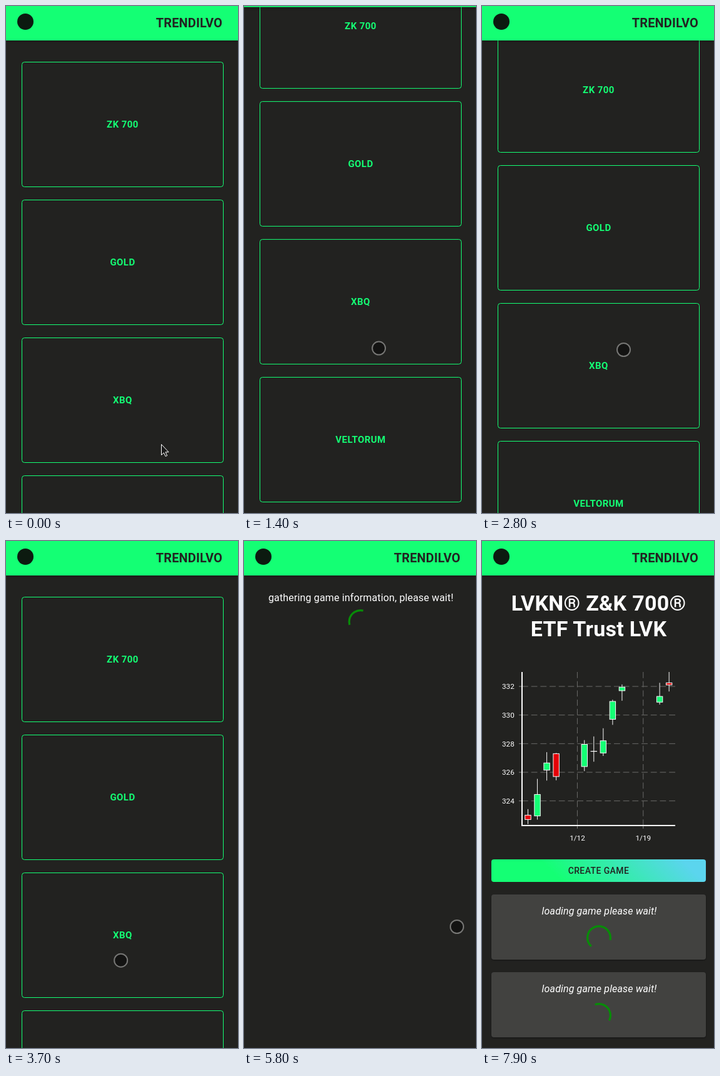
Recreate the animation shown at these times as an HTML page. Size 371x809 px, loop 8 s.

```html
<!DOCTYPE html>
<html lang="en">
<head>
<meta charset="utf-8">
<title>Market game</title>
<style>
  html, body { margin: 0; width: 100%; height: 100%; overflow: hidden; background: #222220; }
  svg { display: block; width: 100%; height: 100%; font-family: Roboto, sans-serif; }
  .mid { text-anchor: middle; }
  .end { text-anchor: end; }
  .card rect { fill: none; stroke: #14ff74; }
  .card text { fill: #14ff74; font: bold 15px Roboto, sans-serif; letter-spacing: .43px; }
  .bar { filter: drop-shadow(0 1px 2px rgba(0,0,0,.3)); }
  .brand { font-weight: bold; font-size: 20px; letter-spacing: .15px; }
  .body { font-size: 16px; letter-spacing: .15px; }
  .title { font-weight: bold; font-size: 34px; letter-spacing: .25px; }
  .axis text { font-size: 12px; fill: #fff; }
  .axis path { stroke: #fff; }
  .axis .grid { stroke: #6c6c6a; stroke-dasharray: 10 5; }
  .axis .tick { stroke: #8a8a88; }
  .axis .main { stroke-width: 2; fill: none; }
  .button { width: 343px; height: 36px; border-radius: 4px;
    background: linear-gradient(45deg, #14ff74 30%, #5bd5ee 90%);
    font: 500 14px/36px Roboto, sans-serif; letter-spacing: .4px; color: #222220; text-align: center; }
  .panel rect { fill: #424240; filter: drop-shadow(0 1px 1px rgba(0,0,0,.4)); }
  .panel text { fill: #fff; font-style: italic; }
  .spin { fill: none; stroke: #088c08; stroke-width: 3.6; }
</style>
</head>
<body>
<svg viewBox="0 0 371 809" preserveAspectRatio="none">
  <rect width="371" height="809" fill="#222220"/>

  <g id="home">
    <g id="cards"></g>
    <rect y="979" width="371" height="131" fill="#14ff74"/>
    <rect x="73" y="1013" width="20" height="20"/>
    <circle cx="186.5" cy="1023" r="10"/>
    <rect x="280" y="1013" width="20" height="20"/>
    <g class="mid" fill="#222220">
      <text class="body" x="186.5" y="1058">Follow us on Social Media!</text>
      <text x="186.5" y="1082" font-size="14" letter-spacing=".15">Copyright © Trendilvo 2020.</text>
    </g>
  </g>

  <g id="wait">
    <text class="body mid" x="187" y="96" fill="#fff">gathering game information, please wait!</text>
  </g>

  <g id="game">
    <g class="title mid" fill="#fff">
      <text x="186.5" y="111">LVKN® Z&amp;K 700®</text>
      <text x="186.5" y="152">ETF Trust LVK</text>
    </g>
    <g id="zoom">
      <g id="chart" class="axis" transform="translate(15 160) scale(.98)"></g>
      <foreignObject x="15" y="508" width="343" height="36">
        <div class="button">CREATE GAME</div>
      </foreignObject>
      <g id="panelA" class="panel"></g>
    </g>
    <g id="panelB" class="panel"></g>
  </g>

  <g id="header">
    <rect class="bar" width="371" height="55" fill="#14ff74"/>
    <circle cx="31" cy="25" r="13" fill="#0c1a10"/>
    <text class="brand end" x="346" y="34" fill="#222220">TRENDILVO</text>
  </g>

  <path id="arrow" d="M248.5 699.5v17l3.9-3.6 2.7 5.7 2.6-1.2-2.6-5.6h5z" fill="#1a1a1a" stroke="#fff"/>
  <circle id="touch" r="10.5" fill="#111" fill-opacity=".85" stroke="#777775" stroke-width="2"/>
</svg>
<script>
const LOOP = 8000, STEP = 100;
const $ = id => document.getElementById(id);

const linear = u => u;
const speedUp = u => u ** 1.5;
const settle = u => 1 - (1 - u) ** 2.5;
const inOut = u => u < .5 ? 2 * u * u : 1 - 2 * (1 - u) ** 2;
const clamp = u => Math.max(0, Math.min(1, u));

function add(parent, tag, attrs, text) {
  const el = document.createElementNS('http://www.w3.org/2000/svg', tag);
  for (const k in attrs) el.setAttribute(k, attrs[k]);
  if (text) el.textContent = text;
  return parent.appendChild(el);
}

// Each move is [begin, end, goal, ease]; the value rests between moves.
function follow(from, moves, t) {
  return moves.reduce((at, [begin, end, goal, ease = linear]) => {
    const u = ease(clamp((t - begin) / (end - begin)));
    return at.map((v, k) => v + (goal[k] - v) * u);
  }, from);
}

const scroll = t => follow([0], [
  [700, 1600, [229], speedUp],
  [1700, 2000, [301]],
  [2200, 2800, [55]],
  [2900, 3200, [0]]
], t);

const headerY = t => follow([0], [[1100, 1500, [-55], settle], [2100, 2650, [0], settle]], t);

const touch = t => follow([240, 712], [
  [0, 300, [218.5, 712]],
  [400, 600, [224.5, 703.5]],
  [700, 1600, [211.5, 474], speedUp],
  [1700, 2000, [267.5, 302]],
  [2100, 2200, [267.5, 309.5]],
  [2200, 2800, [226.5, 548.5]],
  [2900, 3100, [357, 600]],
  [3100, 3300, [207.5, 698.5]],
  [3600, 3900, [136, 610.5]],
  [4000, 4400, [182.5, 236.5], inOut],
  [5500, 5800, [340.5, 615.5], inOut],
  [5900, 6400, [354.5, 658.5]],
  [6700, 7000, [340, 830]]
], t);

function spinner(parent, x, y, turn) {
  const el = add(parent, 'circle', { class: 'spin', r: 20.2 });
  return ms => {
    const p = Math.max(0, ms) / 1400 % 1;
    const grow = inOut(clamp(p * 2)), slide = inOut(clamp(p * 2 - 1));
    el.setAttribute('transform', `translate(${x} ${y}) rotate(${p * 360 + turn}) scale(${40 / 44})`);
    el.setAttribute('stroke-dasharray', `${1 + 99 * grow} 200`);
    el.setAttribute('stroke-dashoffset', -15 * grow - 110 * slide);
  };
}

function panel(id, y, turn) {
  const g = $(id);
  add(g, 'rect', { x: 15, y, width: 343, height: 104, rx: 4 });
  add(g, 'text', { class: 'body mid', x: 187.5, y: y + 32 }, 'loading game please wait!');
  return spinner(g, 187, y + 69, turn);
}

function drawCards(g) {
  ['ZK 700', 'GOLD', 'XBQ', 'VELTORUM'].forEach((name, i) => {
    const card = add(g, 'g', { class: 'card', transform: `translate(0 ${89.5 + 220 * i})` });
    add(card, 'rect', { x: 25.5, width: 322, height: 199, rx: 4 });
    add(card, 'text', { class: 'mid', x: 186.5, y: 104.5 }, name);
  });
}

// The chart lives in a 350 unit box with a 50 unit margin.
function drawChart(g) {
  const near = 50, far = 300, day = 15.35;
  const priceY = price => 73.5 + (332 - price) * 23.3;
  const dayX = n => 59.7 + n * day;
  const path = (d, cls) => add(g, 'path', { d, class: cls });

  for (let price = 332; price > 323; price -= 2) {
    const y = priceY(price);
    path(`M${near} ${y}H${far}`, 'grid');
    path(`M${near} ${y}h-5`, 'tick');
    add(g, 'text', { class: 'end', x: 37.5, y: y + 4.3 }, price);
  }
  for (const date of [12, 19]) {
    const x = dayX(date - 6.75);
    path(`M${x} ${far}V${near}`, 'grid');
    path(`M${x} ${far}v5`, 'tick');
    add(g, 'text', { class: 'mid', x, y: 324.5 }, '1/' + date);
  }
  path(`M${near} ${near}V${far + 1}M${near} ${far}H${far}`, 'main');

  const trades = [[323, 322.7], [322.95, 324.45], [326.15, 326.65], [327.3, 325.7], [326.4, 327.95],
    [327.46, 327.47], [327.35, 328.2], [329.7, 330.95], [331.7, 331.95], [330.9, 331.3], [332.25, 332.1]];
  trades.forEach(([open, close], i) => {
    const x = dayX(i < 4 ? i : i < 9 ? i + 2 : i + 5);  // closed days leave gaps
    const top = priceY(Math.max(open, close)), bottom = priceY(Math.min(open, close));
    const above = 13 + 13 * Math.cos((i - 1.2) * 1.51);
    const below = 10 + 7 * Math.cos((i - 2) * 2.17);
    path(`M${x} ${Math.max(near, top - above)}V${Math.min(far, bottom + below)}`);
    add(g, 'rect', { x: x - 4.8, y: top, width: 9.6, height: bottom - top,
      fill: close < open ? '#e60008' : '#14ff74', stroke: '#fff' });
  });
}

drawCards($('cards'));
drawChart($('chart'));
const spinWait = spinner($('wait'), 186.5, 129, 0);
const spinA = panel('panelA', 564, 129);
const spinB = panel('panelB', 688, 109);

const show = (id, on) => $(id).style.display = on ? '' : 'none';
const shift = (id, x, y) => $(id).setAttribute('transform', `translate(${x} ${y})`);

function zoomIn(id, y, begin, end, t) {
  const s = settle(clamp((t - begin) / (end - begin)));
  $(id).setAttribute('transform', `translate(186.5 ${y}) scale(${s}) translate(-186.5 ${-y})`);
}

function render(t) {
  show('home', t < 4700);
  show('wait', t >= 4700 && t < 6600);
  show('game', t >= 6600);
  show('arrow', t < 100);
  show('touch', t >= 100 && t < 7000);
  shift('home', 0, -scroll(t));
  shift('header', 0, headerY(t));
  shift('touch', ...touch(t));
  zoomIn('zoom', 424, 6500, 7200, t);
  zoomIn('panelB', 740, 7100, 7600, t);
  spinWait(t - 4700);
  spinA(t - 6955);
  spinB(t - 6822);
}

const start = performance.now();
function tick() {
  const t = (performance.now() - start) % LOOP;
  render(Math.floor(t / STEP) * STEP);
  requestAnimationFrame(tick);
}
tick();
</script>
</body>
</html>
```
